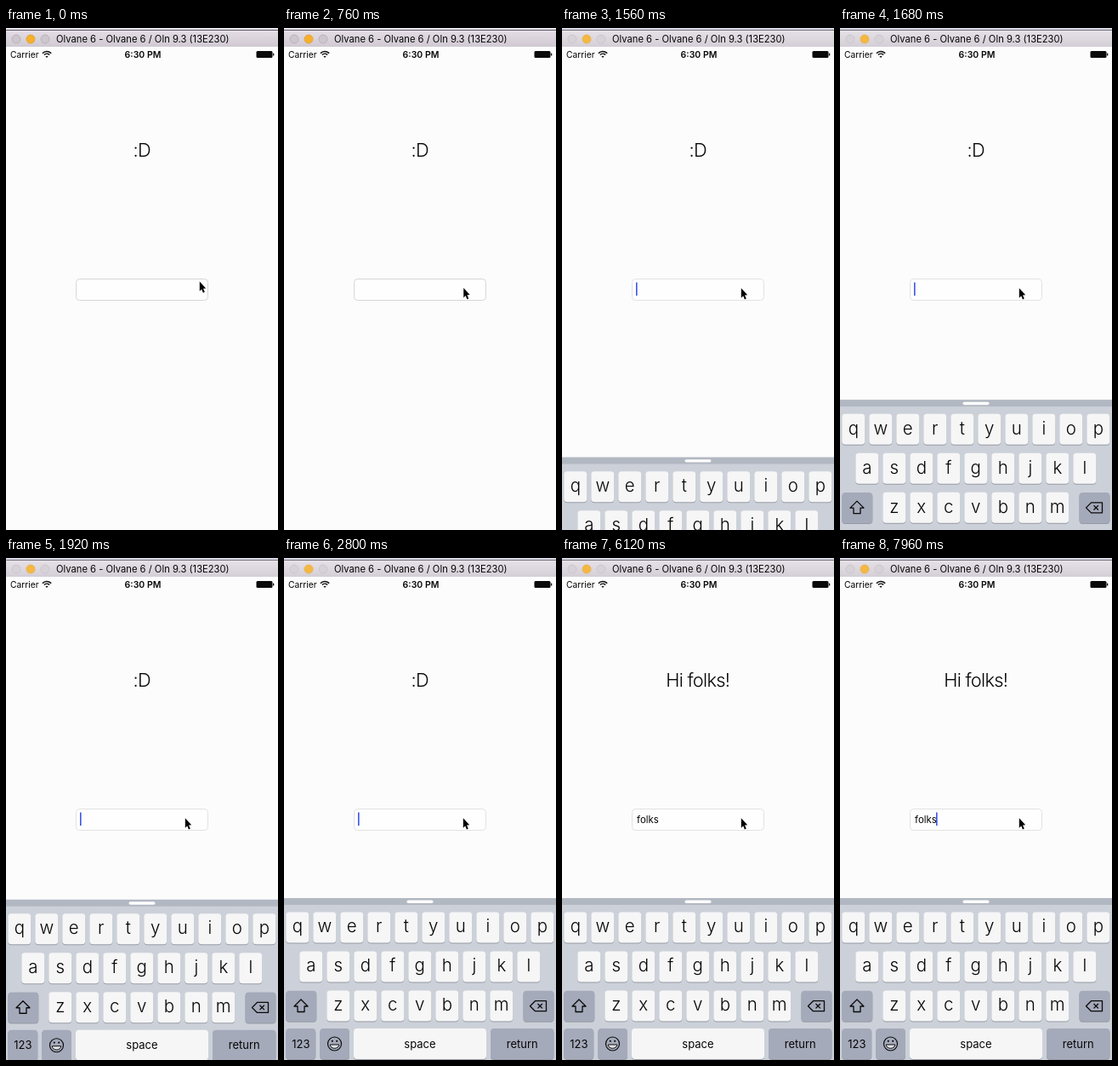
These frames come from a looping animation (320 by 589 pixels, 8000 ms). An HTML page with a canvas:

```html
<!DOCTYPE html>
<html lang="en">
<head>
<meta charset="utf-8">
<title>Greeting form</title>
<style>
  html, body { margin: 0; width: 100%; height: 100%; overflow: hidden; background: #fcfcfc; }
  canvas { display: block; width: 320px; height: 589px; }
</style>
</head>
<body>
<canvas id="stage"></canvas>
<script>
const W = 320, H = 589, LOOP = 8000;
const canvas = document.getElementById('stage');
const ctx = canvas.getContext('2d');
const dpr = window.devicePixelRatio || 1;
canvas.width = W * dpr;
canvas.height = H * dpr;

const FONT = 'Inter, Roboto, "Liberation Sans", sans-serif';
const WORD = 'folks';
const TYPED = [3200, 3680, 4160, 4680, 5200];
const CARET_OFF = [[0, 1200], [2120, 2520], [5840, 6440], [6760, 7360]];
const KB_TOP = 400, KB_START = 1437;

const clamp = v => Math.max(0, Math.min(1, v));
const mix = (a, b, p) => a + (b - a) * p;
const ease = p => p * p * (3 - 2 * p);

function text(str, x, y, size, weight = 400, align = 'left', spacing = 0) {
  ctx.font = `${weight} ${size}px ${FONT}`;
  ctx.letterSpacing = spacing + 'px';
  ctx.textAlign = align;
  ctx.fillStyle = '#060606';
  ctx.fillText(str, x, y);
}

function box(x, y, w, h, r, fill) {
  ctx.beginPath();
  ctx.roundRect(x, y, w, h, r);
  ctx.fillStyle = fill;
  ctx.fill();
}

function dot(x, y, r, fill, edge) {
  ctx.beginPath();
  ctx.arc(x, y, r, 0, Math.PI * 2);
  ctx.fillStyle = fill;
  ctx.fill();
  if (edge) {
    ctx.strokeStyle = edge;
    ctx.lineWidth = 0.8;
    ctx.stroke();
  }
}

function poly(points, close = true) {
  ctx.beginPath();
  points.forEach(([x, y]) => ctx.lineTo(x, y));
  if (close) ctx.closePath();
}

function titleBar(active) {
  const g = ctx.createLinearGradient(0, 3, 0, 22);
  g.addColorStop(0, active ? '#e6e0e7' : '#e4dde5');
  g.addColorStop(1, active ? '#d4ced6' : '#d0c9d2');
  ctx.fillStyle = active ? '#d9dbe6' : '#e9e8ee';
  ctx.fillRect(0, 0, W, 3);
  ctx.fillStyle = active ? '#74727c' : '#5d5a64';
  ctx.fillRect(0, 2, W, 1);
  ctx.fillStyle = g;
  ctx.fillRect(0, 3, W, 19);
  const grey = active ? '#d7d1d8' : '#cdc6ce';
  const edge = active ? '#c8c2ca' : '#b3acb5';
  dot(12, 13, 5, grey, edge);
  dot(29, 13, 5, active ? '#f4b842' : '#f6b02c', active ? '#e9b04a' : '#dfa035');
  dot(46, 13, 5, grey, edge);
  text('Olvane 6 - Olvane 6 / Oln 9.3 (13E230)', 59, 17, 11.2);
}

function statusBar() {
  text('Carrier', 5, 34.6, 10.3);
  text('6:30 PM', 161, 34.6, 10.5, 600, 'center');
  ctx.strokeStyle = '#111';
  ctx.lineWidth = 1.5;
  for (const r of [7, 4.3]) {
    ctx.beginPath();
    ctx.arc(48, 34.5, r, -Math.PI * 0.76, -Math.PI * 0.24);
    ctx.stroke();
  }
  poly([[48, 35], [46.3, 33], [49.7, 33]]);
  ctx.fillStyle = '#111';
  ctx.fill();
  box(294.5, 27, 19, 8, 1.5, '#0a0a0a');
  box(314, 29.4, 1.3, 3.2, 0.6, '#111');
}

function field(typed, caret, focused) {
  box(82.5, 294.5, 155, 25, 4, '#fefefe');
  ctx.strokeStyle = focused ? '#e2e2e2' : '#d6d6d6';
  ctx.lineWidth = 1;
  ctx.stroke();
  text(typed, 88, 310.7, 11.4);
  if (caret) {
    const x = Math.round(88 + ctx.measureText(typed).width - 0.6);
    ctx.fillStyle = '#3a56e4';
    ctx.fillRect(x, 298.5, 1.6, 15.5);
  }
}

function key(x, y, w, label, size = 20.5, dark = false, base = 23.8, weight = 300) {
  box(x, y + 1, w, 36, 4, '#969aa4');
  box(x, y, w, 36, 4, dark ? '#a5aaba' : '#f6f6f7');
  if (label) text(label, x + w / 2, y + base, size, weight, 'center');
}

function icons() {
  ctx.strokeStyle = '#0a0a0a';
  ctx.lineWidth = 1.3;
  ctx.lineJoin = 'round';
  // shift
  poly([[20, 118], [28, 126], [24, 126], [24, 132.5], [16, 132.5], [16, 126], [12, 126]]);
  ctx.stroke();
  // delete
  poly([[289.5, 125.7], [295.5, 119.7], [308.5, 119.7], [308.5, 131.7], [295.5, 131.7]]);
  ctx.stroke();
  poly([[298.5, 123], [303.9, 128.4]], false);
  ctx.stroke();
  poly([[303.9, 123], [298.5, 128.4]], false);
  ctx.stroke();
  // smiley
  ctx.lineWidth = 1.2;
  ctx.beginPath();
  ctx.arc(59.5, 170, 8, 0, Math.PI * 2);
  ctx.stroke();
  dot(56.8, 166.8, 1.1, '#0a0a0a');
  dot(62.2, 166.8, 1.1, '#0a0a0a');
  ctx.beginPath();
  ctx.ellipse(59.5, 171, 5.2, 4.3, 0, 0, Math.PI);
  ctx.closePath();
  ctx.fillStyle = '#e4e5ea';
  ctx.fill();
  ctx.lineWidth = 1;
  ctx.stroke();
}

function keyboard(top) {
  ctx.save();
  ctx.translate(0, top);
  ctx.fillStyle = '#ccd1d9';
  ctx.fillRect(0, 0, W, 200);
  ctx.fillStyle = '#b2b8c2';
  ctx.fillRect(0, -1, W, 8);
  box(144.5, 1.6, 31, 3.4, 1.7, '#fdfdfd');
  ['qwertyuiop', 'asdfghjkl', 'zxcvbnm'].forEach((row, r) => {
    const left = [2.3, 18.3, 50.3][r];
    [...row].forEach((c, i) => key(left + i * 32, 15.6 + r * 46, 27, c));
  });
  key(2.3, 107.8, 36, '', 13, true);
  key(281.5, 107.8, 36, '', 13, true);
  const base = 22.6;
  key(2.3, 152, 35, '123', 13, true, base, 400);
  key(42.3, 152, 34.7, '', 13, true);
  key(82, 152, 156, 'space', 13, false, base, 400);
  key(243, 152, 74.5, 'return', 13, true, base, 400);
  icons();
  ctx.restore();
}

function pointer(x, y) {
  ctx.save();
  ctx.translate(x, y);
  ctx.scale(0.88, 0.96);
  poly([[0, 0], [0, 11.8], [2.7, 9.3], [4.7, 13.8], [6.8, 12.8], [4.8, 8.5], [8.4, 8.3]]);
  ctx.lineJoin = 'round';
  ctx.lineWidth = 1.4;
  ctx.strokeStyle = '#fff';
  ctx.stroke();
  ctx.fillStyle = '#000';
  ctx.fill();
  ctx.restore();
}

// Critically damped slide, as system keyboards do.
function slide(t) {
  const s = Math.max(0, t - KB_START) * 0.0122;
  return clamp(1.01 * (1 - (1 + s) * Math.exp(-s)));
}

function draw(t) {
  ctx.setTransform(dpr, 0, 0, dpr, 0, 0);
  ctx.fillStyle = '#fcfcfc';
  ctx.fillRect(0, 0, W, H);
  titleBar(t >= 880);
  statusBar();

  const typed = WORD.slice(0, TYPED.filter(at => t >= at).length);
  const caret = !CARET_OFF.some(([a, b]) => t >= a && t < b);
  text(typed ? `Hi ${typed}!` : ':D', 159.8, 150.8, 21.8, 300, 'center', -0.7);
  field(typed, caret, t >= 1200);

  const p = slide(t);
  if (p > 0) keyboard(mix(H, KB_TOP, p));

  const m = ease(clamp((t - 20) / 820));
  pointer(mix(227.8, 210.8, m), mix(297.5, 305.3, m));
}

let start;
function tick(now) {
  start ??= now;
  draw((now - start) % LOOP);
  requestAnimationFrame(tick);
}
requestAnimationFrame(tick);
</script>
</body>
</html>
```
